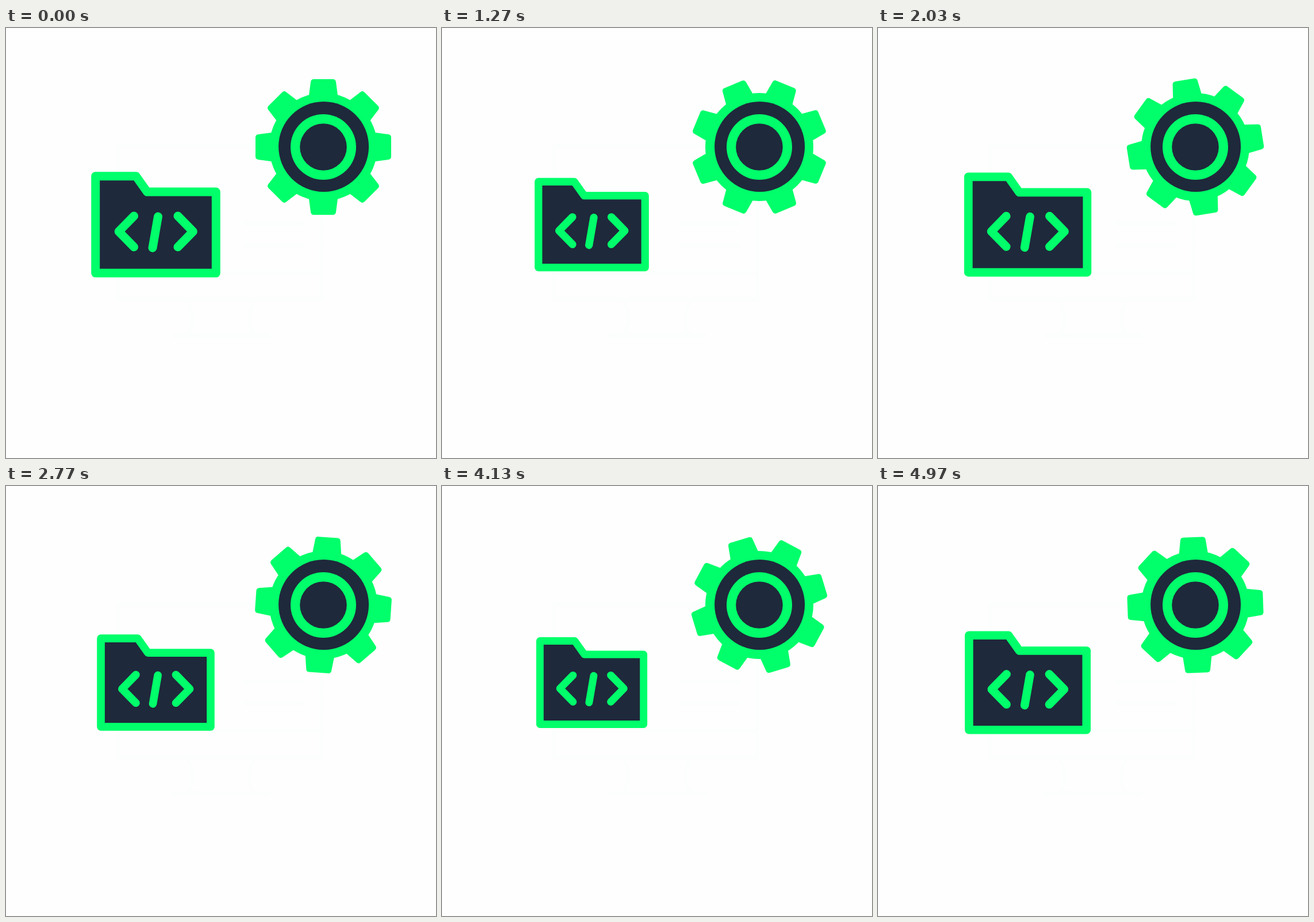
Animation, 748 px wide and 748 px high, one loop 5.01 s. Source, as an HTML page:

```html
<!DOCTYPE html>
<html lang="en">
<head>
<meta charset="utf-8">
<title>Code folder and gear</title>
<style>
  html, body { margin: 0; width: 100%; height: 100%; overflow: hidden; background: #fefefe; }
  svg { display: block; width: 100%; height: 100%; }
  .line { stroke: #00ff6a; stroke-linecap: round; stroke-linejoin: round; }
  .green { fill: #00ff6a; }
  .dark { fill: #1e293b; }
  .ghost { fill: none; stroke: #fcfefd; stroke-width: 7; stroke-linecap: round; stroke-linejoin: round; }
</style>
</head>
<body>
<svg viewBox="0 0 748 748">
  <defs>
    <path id="tooth" class="green line" stroke-width="11" d="M-20-86 L-16.5-112.5 H16.5 L20-86Z"/>
  </defs>

  <!-- barely visible monitor -->
  <path class="ghost" d="M195 206H549V472H195Z M198 426H546 M415 340H515 M415 378H515 M318 478Q332 510 316 532 M430 478Q416 510 430 532 M292 535H458"/>

  <!-- pivot of the pulse is the folder's middle -->
  <g transform="translate(260.6 342)">
    <g id="folder">
      <g transform="translate(-260.6 -342)" stroke-width="15">
        <path class="dark line" d="M155.5 257.5H226L245.5 285H365.5V426.5H155.5Z"/>
        <path class="line" fill="none" d="M222.5 327L196 354L222.5 381 M264.5 328L255 382.5 M299 327L325.5 354L299 381"/>
      </g>
    </g>
  </g>

  <g transform="translate(552 207)">
    <g id="teeth"></g>
    <circle class="green" r="94"/>
    <circle class="dark" cx=".6" cy="-.6" r="78.5"/>
    <circle class="green" r="57"/>
    <circle class="dark" r="40.8"/>
  </g>
</svg>
<script>
  const LOOP = 5010, FRAMES = 150, STEP = 100 / 3;
  const SPIN = 0.0177;                  // degrees per ms
  const PEAK = 222, PERIOD = 1455;      // pulse timing in ms
  const HOLD = 15, FALL = 840;
  const MAX = 1.153, SHRINK = 0.000465, GROW = 0.00065;

  const folder = document.getElementById('folder');
  const teeth = document.getElementById('teeth');

  for (let i = 0; i < 8; i++) {
    const tooth = document.createElementNS('http://www.w3.org/2000/svg', 'use');
    tooth.setAttribute('href', '#tooth');
    tooth.setAttribute('transform', `rotate(${i * 45})`);
    teeth.append(tooth);
  }

  // Exponential shrink from the peak, then a faster exponential growth back.
  function pulse(t) {
    const age = (t - PEAK + PERIOD) % PERIOD;
    if (age < HOLD + FALL) return MAX * Math.exp(-SHRINK * Math.max(0, age - HOLD));
    return MAX * Math.exp(-GROW * (PERIOD - age));
  }

  function draw(now) {
    const frame = Math.min(FRAMES - 1, Math.floor((now % LOOP + 5) / STEP));
    const t = frame * STEP;
    teeth.setAttribute('transform', `rotate(${SPIN * t})`);
    folder.setAttribute('transform', `scale(${pulse(t)})`);
  }

  const start = performance.now();
  function tick() {
    draw(performance.now() - start);
    requestAnimationFrame(tick);
  }
  tick();
</script>
</body>
</html>
```
